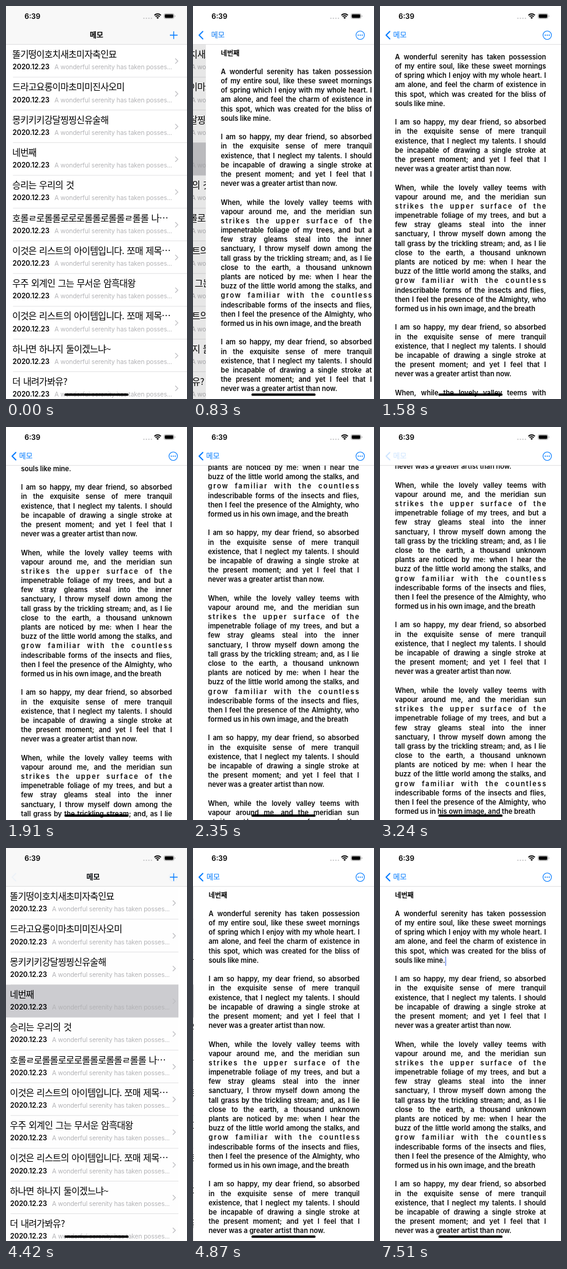
Write an HTML page that moves like this. It is 296 px wide and 640 px high and loops after 8 s.

```html
<!DOCTYPE html>
<html lang="ko">
<head>
<meta charset="utf-8">
<title>Memo</title>
<style>
html, body { margin: 0; width: 100%; height: 100%; overflow: hidden; background: #fff; }
#stage { position: absolute; left: 0; top: 0; width: 296px; height: 640px; overflow: hidden; background: #fff; }
svg, #page { position: absolute; left: 0; top: 0; width: 296px; height: 640px; }
svg { overflow: visible; }
svg text { font-family: Inter, "Noto Sans CJK KR", "Noto Sans CJK", sans-serif; }
#page { background: #fff; overflow: hidden; }
#text { position: absolute; left: 24.5px; top: 69.5px; width: 247px;
  font: 600 11.05px/15.2px Inter, "Noto Sans CJK KR", "Noto Sans CJK", sans-serif; color: #080808; }
#text div { height: 15.2px; white-space: nowrap; }
.full { text-align: justify; text-align-last: justify; }
.wide { letter-spacing: 1.8px; margin-right: -1.8px; }
#caret { position: absolute; left: 82.2px; top: 107px; width: 1.5px; height: 15px; background: #4169e1; }
#list .name { font-family: "Noto Sans CJK KR", "Noto Sans CJK", sans-serif; font-size: 15px; letter-spacing: -.7px; word-spacing: 1px; }
.date { font-size: 11.2px; font-weight: 600; }
.note { font-size: 10.3px; letter-spacing: -.13px; fill: #b4b4b7; }
.line { fill: none; stroke: #007aff; }
.blue { fill: #007aff; }
</style>
</head>
<body>
<div id="stage">
  <svg id="list" viewBox="0 0 296 640"></svg>
  <div id="page"><div id="text"></div></div>
  <svg id="nav" viewBox="0 0 296 640">
    <rect width="296" height="62.5" fill="#fff"/>
    <rect id="tint" width="296" height="62.5" fill="#f8f8f8"/>
    <rect y="62.2" width="296" height=".7" fill="#d4d4d6"/>
    <g id="home">
      <text x="148" y="52" text-anchor="middle" font-size="12" font-weight="700">메모</text>
    </g>
    <path id="plus" class="line" stroke-width="1.3" d="M268 47.5h12.6M274.3 41.2v12.6"/>
    <path id="arrow" class="line" stroke-width="1.8" stroke-linecap="round" stroke-linejoin="round" d="M16 41.5l-6 6 6 6"/>
    <g id="back"><text x="21.5" y="52" font-size="12" class="blue">메모</text></g>
    <g id="more" class="blue">
      <circle cx="273.5" cy="47.6" r="6.9" class="line" stroke-width="1.1"/>
      <circle cx="270.3" cy="47.6" r="1"/><circle cx="273.5" cy="47.6" r="1"/><circle cx="276.7" cy="47.6" r="1"/>
    </g>
    <text x="43.2" y="20.7" text-anchor="middle" font-size="11.6" font-weight="600">6:39</text>
    <g fill="#c2c2c4">
      <circle cx="225.5" cy="20" r="1.1"/><circle cx="229.6" cy="20" r="1.1"/>
      <circle cx="233.7" cy="20" r="1.1"/><circle cx="237.8" cy="20" r="1.1"/>
    </g>
    <path d="M242.7 15.2a7.4 7.4 0 0 1 10.6 0M244.6 17.3a4.8 4.8 0 0 1 6.8 0" fill="none" stroke="#000" stroke-width="1.7"/>
    <path d="M248 21l-2-2.1a2.8 2.8 0 0 1 4 0z"/>
    <rect x="258.4" y="12.4" width="16.4" height="8.2" rx="2.4" fill="none" stroke="#a5a5a5" stroke-width=".8"/>
    <rect x="259.6" y="13.6" width="14" height="5.8" rx="1.4"/>
    <path d="M275.8 15a1.6 1.6 0 0 1 0 3z" fill="#a5a5a5"/>
    <rect x="95.5" y="631" width="105" height="3.8" rx="1.9"/>
  </svg>
</div>
<script>
const $ = id => document.getElementById(id);
const W = 296, TOP = 62.7, ROW = 53.3, PICKED = 3;

const item = "이것은 리스트의 아이템입니다. 쪼매 제목⋯";
const names = ["똘기떵이호치새초미자축인묘", "드라고요롱이마초미미진사오미", "몽키키키강달찡찡신유술해", "네번째",
  "승리는 우리의 것", "호롤ㄹ로롤롤로로로롤롤로롤롤ㄹ롤롤 나⋯", item, "우주 외계인 그는 무서운 암흑대왕", item,
  "하나면 하나지 둘이겠느냐~", "더 내려가봐유?"];

$("list").innerHTML =
  `<rect id="pick" y="${TOP + ROW * PICKED}" width="296" height="${ROW}" fill="#cdcdd1"/>` +
  names.map((name, i) => `<g transform="translate(0 ${TOP + ROW * i})">
    <text class="name" x="10.3" y="21.4">${name}</text>
    <text class="date" x="10.8" y="40.6">2020.12.23</text>
    <text class="note" x="79.3" y="40.6">A wonderful serenity has taken posses...</text>
    <path d="M276.8 22.8l4.2 4.2-4.2 4.2" fill="none" stroke="#bfbfc3" stroke-width="1.3"/>
    <rect x="11.4" y="${ROW - .4}" width="285" height=".7" fill="#d8d8da"/></g>`).join("") +
  `<rect id="dim" width="400" height="640"/>`;

const intro = `A wonderful serenity has taken possession
of my entire soul, like these sweet mornings
of spring which I enjoy with my whole heart. I
am alone, and feel the charm of existence in
this spot, which was created for the bliss of
souls like mine.`;
const happy = `I am so happy, my dear friend, so absorbed
in the exquisite sense of mere tranquil
existence, that I neglect my talents. I should
be incapable of drawing a single stroke at
the present moment; and yet I feel that I
never was a greater artist than now.`;
const valley = `When, while the lovely valley teems with
vapour around me, and the meridian sun
strikes the upper surface of the
impenetrable foliage of my trees, and but a
few stray gleams steal into the inner
sanctuary, I throw myself down among the
tall grass by the trickling stream; and, as I lie
close to the earth, a thousand unknown
plants are noticed by me: when I hear the
buzz of the little world among the stalks, and
grow familiar with the countless
indescribable forms of the insects and flies,
then I feel the presence of the Almighty, who
formed us in his own image, and the breath`;

const paragraph = text => text.split("\n").map((line, i, all) => {
  const full = i < all.length - 1 ? "full" : "";
  const wide = /^(strikes|grow)/.test(line) ? " wide" : "";
  return `<div class="${full}${wide}">${line}</div>`;
}).join("");
const body = Array(4).fill([happy, valley]).flat();
$("text").innerHTML = [names[PICKED], intro, ...body].map(paragraph).join("<div></div>") + `<i id="caret"></i>`;

// The picture moves in discrete ticks: start, end, number of steps
const spans = [[500, 1030, 6], [1580, 2350, 8], [2460, 3240, 8], [3350, 3900, 6], [4420, 4870, 5], [7510, 7510, 2]];
function snap(t) {
  const span = spans.filter(s => s[0] <= t).pop();
  if (!span) return 0;
  const [a, b, n] = span;
  if (t >= b) return b;
  const d = (b - a) / (n - 1);
  return a + Math.floor((t - a) / d) * d;
}

// Distance left in a critically damped slide
function slide(t, start) {
  const u = Math.max(0, t - start) * .0166;
  return W * (1 + u) * Math.exp(-u);
}

function pageX(t) {
  if (t < 500) return W;
  if (t < 1580) return slide(t, 559);
  if (t < 3350) return 0;
  if (t < 4420) return W - slide(t, 3329);
  return t < 7510 ? slide(t, 4399) : 0;
}

// Finger drag, then a flick that dies away
function scrollY(t) {
  if (t < 1580 || t >= 4420) return 0;
  if (t < 2020) return 24.3 + 144 * ((t - 1580) / 440) ** 1.6;
  return 596.5 - 221 * Math.exp((2350 - Math.min(t, 3240)) / 500);
}

const fade = (id, value) => $(id).style.opacity = value;
const move = (id, x, y = 0) => $(id).style.transform = `translate(${x}px, ${y}px)`;

function draw(time) {
  const t = snap(time);
  const x = Math.round(pageX(t)), p = 1 - x / W;
  const pressed = t >= 3240 && t < 3350 ? .2 : 1;

  move("list", Math.round(-.3 * (W - x)));
  move("page", x);
  move("text", 0, -scrollY(t));
  fade("dim", .1 * p);
  fade("pick", t < 500 ? 0 : t >= 3350 && t < 4420 ? p : 1);
  fade("caret", t >= 7510 ? 1 : 0);

  move("home", -115.5 * p);
  move("back", 115.5 * (1 - p));
  fade("home", 1 - p);
  fade("back", p * pressed);
  fade("arrow", p * pressed);
  fade("tint", 1 - p);
  fade("plus", 1 - p);
  fade("more", p);
}

const begin = performance.now();
function loop() {
  draw((performance.now() - begin) % 8000);
  requestAnimationFrame(loop);
}
loop();
</script>
</body>
</html>
```
